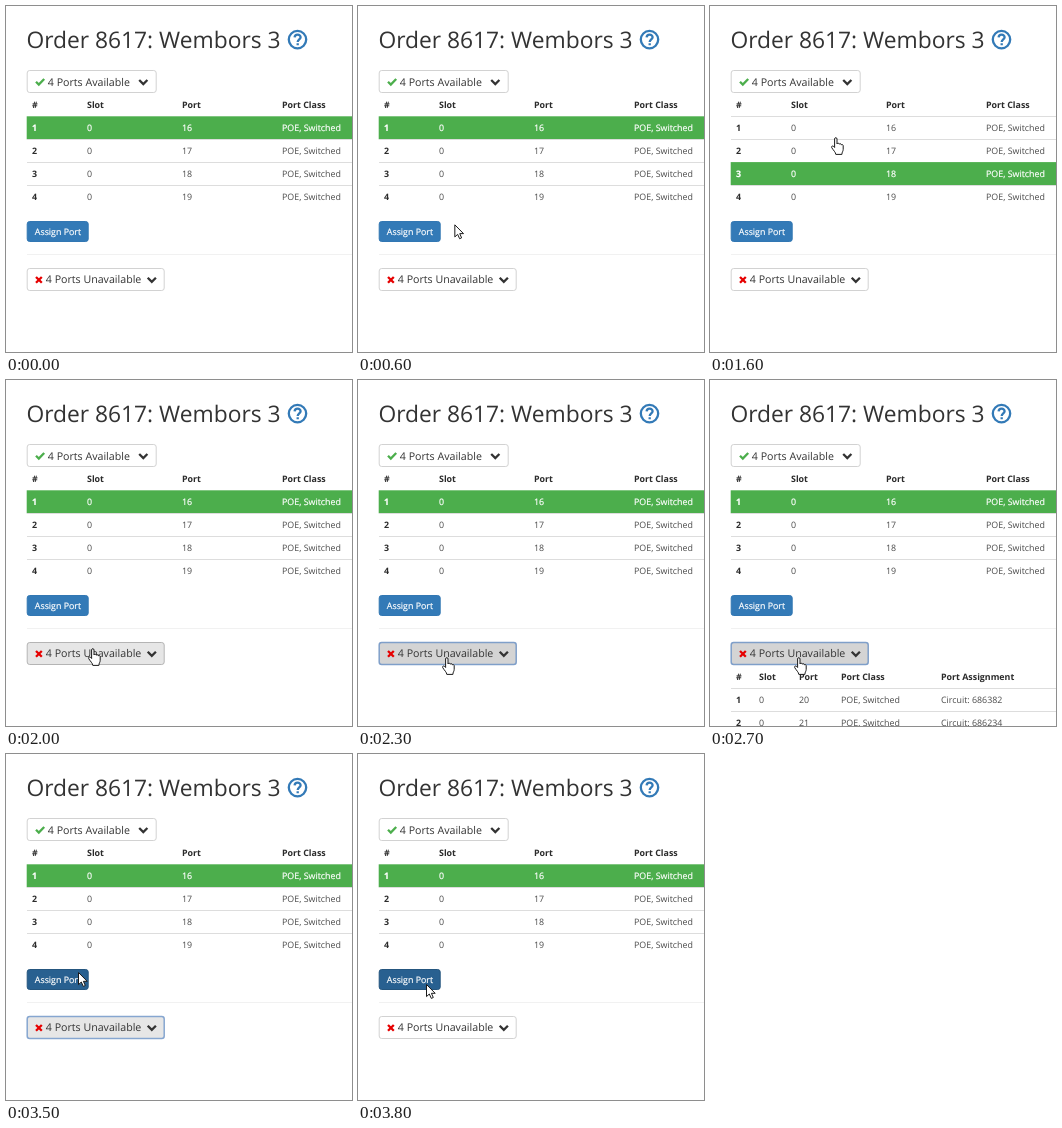
These frames come from a looping animation (346 px wide and 346 px high, 4.1 s). An HTML page:

```html
<!DOCTYPE html>
<html lang="en">
<head>
<meta charset="utf-8">
<title>Port assignment</title>
<style>
html, body { margin: 0; width: 100%; height: 100%; overflow: hidden; background: #fff; }
svg { display: block; width: 346px; height: 346px; }
text { font-family: "Open Sans", "Noto Sans", sans-serif; font-size: 8.87px; fill: #4a4a4a; text-rendering: geometricPrecision; }
text.b { font-weight: 700; fill: #2b2b2b; }
text.btn { font-size: 10.65px; fill: #333; }
.on text, text.light { fill: #fff; stroke: #fff; stroke-width: .2; }
.line { stroke: #ddd; }
.on .line { stroke: none; }
.icon { fill: none; stroke-width: 2.3; }
.cursor { fill: #fff; stroke: #1a1a1a; stroke-width: 1; stroke-linejoin: round; }
</style>
</head>
<body>
<svg viewBox="0 0 346 346">
  <text x="20.4" y="41.5" style="font-size:22.8px;fill:#333">Order 8617: Wembors 3</text>
  <g fill="none" stroke="#337ab7" stroke-width="2.3">
    <circle cx="291.5" cy="33.6" r="8.7"/>
    <path d="M288.6 31.4c.2-3.6 6-3.6 6-.2 0 2.2-2.9 2.2-2.9 4.8M291.7 37.2v2.1"/>
  </g>

  <rect x="21.2" y="64.5" width="129" height="22" rx="2.5" fill="#fff" stroke="#d2d2d2"/>
  <path class="icon" stroke="#4cae4c" d="M30 75.8l2.8 2.8 5.4-5.6"/>
  <text class="btn" x="41.8" y="79.5">4 Ports Available</text>
  <path class="icon" stroke="#333" d="M133.2 74l4.1 4.1 4.1-4.1"/>

  <g id="free"></g>

  <g id="assign">
    <rect x="21.2" y="215.5" width="61" height="20" rx="2.5"/>
    <text class="light" x="28.8" y="228.5">Assign Port</text>
  </g>
  <path d="M21 248.5H346" stroke="#f1f1f1"/>

  <clipPath id="clip"><rect id="reveal" x="0" y="285" width="346" height="0"/></clipPath>
  <g id="used" clip-path="url(#clip)"></g>

  <rect id="toggle" x="21.2" y="262.5" width="137" height="22" rx="2.5"/>
  <path class="icon" stroke="#e60000" d="M30 271l5.8 5.8m0-5.8l-5.8 5.8"/>
  <text class="btn" x="39.8" y="277.4">4 Ports Unavailable</text>
  <path class="icon" stroke="#333" d="M141.7 271.8l4.1 4.1 4.1-4.1"/>

  <path id="arrow" class="cursor" d="M.5 .5V12.6L3.3 10 5.3 14.4 7.3 13.5 5.4 9.3H9.2Z"/>
  <path id="hand" class="cursor" d="M3.6 10.5V2C3.6 .2 6 .2 6 2V7C6.4 5.8 8.1 6 8.2 7.2 8.8 6.2 10.2 6.6 10.3 7.8 11.2 7.1 12.2 7.7 12.2 8.8V12.4C12.2 14.4 10.9 15 10.9 17.4H4.8C4.6 15 2.6 13.8 .7 10.6 .1 9.2 1.7 8.4 2.6 9.4Z"/>
</svg>
<script>
const LOOP = 4100, STEP = 100;
const $ = id => document.getElementById(id);

function add(parent, tag, attrs, content = "") {
  const el = document.createElementNS("http://www.w3.org/2000/svg", tag);
  for (const k in attrs) el.setAttribute(k, attrs[k]);
  el.textContent = content;
  return parent.appendChild(el);
}

function table(parent, top, cols, head, rows) {
  head.forEach((s, i) => add(parent, "text", { x: cols[i], y: top + 12.6, class: "b" }, s));
  return rows.map((cells, r) => {
    const y = top + 21 + r * 22.9;
    const g = add(parent, "g", {});
    const fill = add(g, "rect", { x: 20.7, y: y, width: 325.3, height: 23, fill: "#4cae4c" });
    add(g, "path", { d: `M21 ${Math.round(y) + .5}H346`, class: "line" });
    cells.forEach((s, i) => add(g, "text", { x: cols[i], y: y + 14.8, class: i ? "" : "b" }, s));
    return { g, fill };
  });
}

const kind = "POE, Switched";
const freeRows = table($("free"), 89.3, [26, 81, 176, 276], ["#", "Slot", "Port", "Port Class"],
  [16, 17, 18, 19].map((p, i) => [i + 1, 0, p, kind]));
const usedRows = table($("used"), 287.3, [26, 49, 89, 131, 231],
  ["#", "Slot", "Port", "Port Class", "Port Assignment"],
  [["20", "686382"], ["21", "686234"]].map(([p, c], i) => [i + 1, 0, p, kind, "Circuit: " + c]));
usedRows.forEach(r => r.fill.remove());

// pointer path: time, x, y
const path = [
  [100, 74, 263], [200, 28, 222], [400, 28, 222], [500, 30, 235], [800, 229, 185],
  [1000, 119, 158], [1300, 119, 158], [1600, 121, 131], [1700, 121, 120], [1800, 121, 120],
  [2000, 82, 268], [2200, 84, 277], [2800, 84, 277], [3100, 77.5, 163], [3200, 78, 168],
  [3400, 74, 212], [3700, 68, 230], [LOOP, 68, 230]
];

function pointer(t) {
  const i = Math.max(1, path.findIndex(p => p[0] >= t));
  const [t0, x0, y0] = path[i - 1], [t1, x1, y1] = path[i];
  const k = (t - t0) / (t1 - t0);
  return [x0 + (x1 - x0) * k, y0 + (y1 - y0) * k];
}

const clamp = v => Math.min(1, Math.max(0, v));
const ease = v => v * v * (3 - 2 * v);

function paint(el, fill, stroke, width = 1) {
  el.setAttribute("fill", fill);
  el.setAttribute("stroke", stroke);
  el.setAttribute("stroke-width", width);
}

function draw(now) {
  const t = Math.floor((now % LOOP) / STEP) * STEP;

  const picked = t >= 1200 && t < 1800 ? 2 : 0;
  freeRows.forEach(({ g, fill }, i) => {
    g.setAttribute("class", i === picked ? "on" : "");
    fill.setAttribute("visibility", i === picked ? "visible" : "hidden");
  });

  const open = ease(clamp((t - 2300) / 350)) - ease(clamp((t - 2750) / 350));
  $("reveal").setAttribute("height", 115 * open);

  const toggle = $("toggle");
  if (t >= 2300 && t < 2900) paint(toggle, "#d4d4d4", "#7f9fc9", 1.5);
  else if (t >= 2900 && t < 3700) paint(toggle, "#e6e6e6", "#86a6d0", 1.5);
  else if (t >= 2000 && t < 2300) paint(toggle, "#e6e6e6", "#b4b4b4");
  else paint(toggle, "#fff", "#d2d2d2");

  const hot = t >= 3500;
  paint($("assign").firstElementChild, t === 3700 ? "#204d74" : hot ? "#286090" : "#337ab7", hot ? "#25567f" : "#3277b3");

  const [x, y] = pointer(t);
  const link = t > 500 && ((y > 111 && y < 201) || y > 262);
  for (const [id, show] of [["arrow", !link], ["hand", link]]) {
    $(id).setAttribute("transform", `translate(${x} ${y})`);
    $(id).setAttribute("visibility", show && t >= 100 ? "visible" : "hidden");
  }
}

const start = performance.now();
function tick() {
  draw(performance.now() - start);
  requestAnimationFrame(tick);
}
tick();
</script>
</body>
</html>
```
